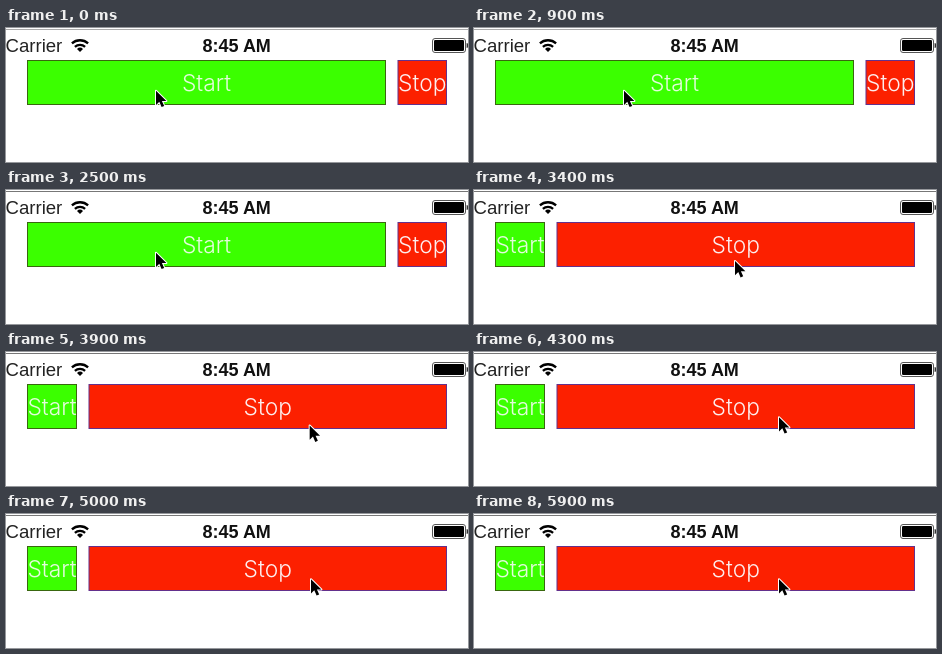
An HTML page that plays this animation: 462 by 134 pixels, repeating every 6.5 s.

```html
<!DOCTYPE html>
<html lang="en">
<head>
<meta charset="utf-8">
<title>Start and Stop</title>
<style>
  html, body { margin: 0; width: 100%; height: 100%; overflow: hidden; background: #fff; }
  svg { display: block; width: 462px; height: 134px; }
  .bar { font: 18.6px "Liberation Sans", Arial, sans-serif; fill: #222; }
  .clock { font: bold 18px "Liberation Sans", Arial, sans-serif; text-anchor: middle; fill: #111; }
  .label { font: 350 22.8px Inter, "Liberation Sans", sans-serif; text-anchor: middle; }
</style>
</head>
<body>
<svg viewBox="0 0 462 134">
  <rect id="edge" y="1" width="462" height="1"/>

  <text class="bar" x="-0.5" y="24">Carrier</text>
  <g fill="none" stroke="#000" stroke-width="2.3">
    <path d="M65.9 15.4 A12 12 0 0 1 82.1 15.4"/>
    <path d="M68.9 18.9 A7.6 7.6 0 0 1 79.1 18.9"/>
  </g>
  <path d="M74 24 L71 21 A4.4 4.4 0 0 1 77 21 Z"/>
  <text class="clock" x="230.7" y="24">8:45 AM</text>
  <rect x="426.5" y="10.5" width="33" height="14" rx="2.5" fill="none" stroke="#555"/>
  <rect x="428" y="12" width="30" height="11" rx="1.2"/>
  <path d="M460.6 15 Q462.4 15.2 462.4 17.5 T460.6 20 Z" fill="#333"/>

  <g id="start">
    <rect y="32.5" height="44" fill="#3bff00" stroke="#39670f"/>
    <text class="label" y="63.2" fill="#e4fbdc">Start</text>
  </g>
  <g id="stop">
    <rect y="32.5" height="44" fill="#fc2000" stroke="#63308c"/>
    <text class="label" y="63.2" fill="#fdeeee">Stop</text>
  </g>

  <path id="cursor" d="M0 0 V14.2 L3.3 11.1 L5.6 16.4 L8.2 15.3 L5.9 10.2 H10.4 Z"
        fill="#000" stroke="#fff" stroke-width="2" stroke-linejoin="round" paint-order="stroke"/>
</svg>
<script>
  const LOOP = 6500, STEP = 100;
  const LEFT = 21.5, RIGHT = 440.5, GAP = 12.5;
  const WIDE = 379.5, NARROW = 70.5;

  // time, x, y of the pointer tip
  const path = [
    [0, 150, 62.7], [3000, 150, 62.7], [3200, 190, 65.5], [3400, 261, 71],
    [3600, 292, 80], [3800, 303, 77], [4100, 305, 66.5], [4300, 305, 65.2], [LOOP, 305, 65.2]
  ];

  const $ = id => document.getElementById(id);
  const clamp = v => Math.max(0, Math.min(1, v));
  const ease = v => v * v * (3 - 2 * v);
  const mix = (a, b, p) => a + (b - a) * p;

  function pointerAt(t) {
    const i = path.findIndex(k => k[0] > t);
    const a = path[i - 1], b = path[i];
    const p = (t - a[0]) / (b[0] - a[0]);
    return [mix(a[1], b[1], p), mix(a[2], b[2], p)];
  }

  function place(id, left, right) {
    const [box, label] = $(id).children;
    box.setAttribute("x", left);
    box.setAttribute("width", right - left);
    label.setAttribute("x", (left + right) / 2);
  }

  function draw(t) {
    const split = mix(WIDE, NARROW, ease(clamp((t - 2950) / 350)));
    place("start", LEFT, split);
    place("stop", split + GAP, RIGHT);
    $("cursor").setAttribute("transform", `translate(${pointerAt(t)})`);
    $("edge").setAttribute("fill", t < 1400 ? "#aaa" : "#777");
  }

  let origin;
  function frame(now) {
    origin ??= now;
    const t = (now - origin) % LOOP;
    draw(Math.floor(t / STEP) * STEP);
    requestAnimationFrame(frame);
  }
  draw(0);
  requestAnimationFrame(frame);
</script>
</body>
</html>
```
